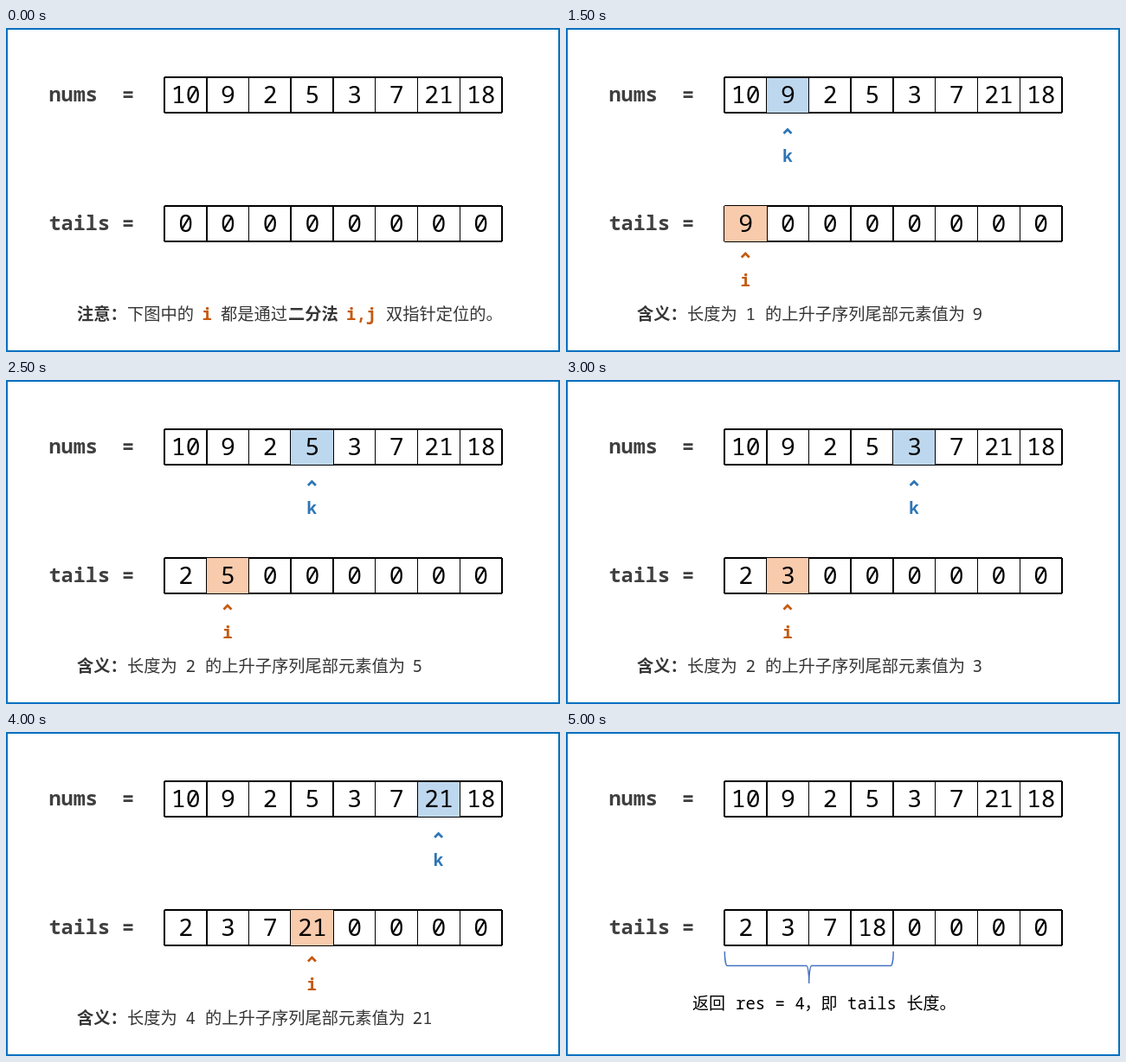
Recreate the animation shown at these times as an HTML page. Size 640x375 px, loop 6.5 s.

```html
<!DOCTYPE html>
<html lang="zh-CN">
<head>
<meta charset="utf-8">
<title>最长上升子序列</title>
<style>
  html, body { margin: 0; width: 100%; height: 100%; overflow: hidden; background: #fff; }
  svg { display: block; width: 640px; height: 375px; }
  text { white-space: pre; font-family: "Noto Sans Mono", "Noto Sans CJK SC", "Noto Sans CJK", monospace; }
  .cjk { font-family: "Noto Sans CJK SC", "Noto Sans CJK", sans-serif; }
  .label { font-size: 23.5px; font-weight: 700; fill: #404040; }
  .digit { font-size: 28px; text-anchor: middle; fill: #000; }
  .note { font-size: 19.25px; fill: #363636; }
  .result { font-size: 19px; fill: #000; }
  .bold { font-weight: 700; }
  .hot { font-weight: 700; fill: #c55a11; }
  .pointer { font-size: 19.4px; font-weight: 700; text-anchor: middle; }
</style>
</head>
<body>
<svg id="stage" viewBox="0 0 640 375"></svg>
<script>
const LOOP = 6500, INTRO = 1000, STEP = 500;
const LEFT = 183.3, CELL = 48.72, HEIGHT = 41;
const BLUE = '#2e75b6', ORANGE = '#c55a11';
const nums = [10, 9, 2, 5, 3, 7, 21, 18];
const stage = document.getElementById('stage');

const cellX = i => LEFT + i * CELL;
const centre = i => cellX(i) + CELL / 2;
const lineEnd = i => Math.floor(cellX(i)) + 1;
const lineWidth = i => [0, 1, 3, 4, 8].includes(i) ? 2 : 1;
const box = (x, y, w, h, fill = '#000') =>
  `<rect x="${x}" y="${y}" width="${w}" height="${h}" fill="${fill}"/>`;
const text = (x, y, cls, str, fill = '') =>
  `<text x="${x}" y="${y}" class="${cls}"${fill && ` style="fill:${fill}"`}>${str}</text>`;
const line = (y, cls, parts) =>
  parts.map(([x, str, extra = '']) => text(x, y, `${cls} ${extra}`, str)).join('');

// History of the tails array: one entry per processed number.
const steps = [];
const tails = nums.map(() => 0);
let length = 0;
nums.forEach((value, k) => {
  let i = 0;
  while (i < length && tails[i] < value) i++;
  tails[i] = value;
  length = Math.max(length, i + 1);
  steps.push({ k, i, value, tails: [...tails] });
});

// The active cell's fill leaves one pixel of line on each side; `top` is where it begins.
function row(y, name, values, active, fill, top) {
  let grid = '';
  for (let i = 0; i <= nums.length; i++)
    grid += box(lineEnd(i) - lineWidth(i), y, lineWidth(i), HEIGHT);
  const first = lineEnd(0) - 1, last = lineEnd(nums.length) - 1;
  for (const edge of [y - 1, y + HEIGHT - 1])
    grid += box(first, edge, last - first, 2);
  if (active >= 0) {
    const x = lineEnd(active) - lineWidth(active) + 1;
    grid += box(x, top, lineEnd(active + 1) - 1 - x, y + HEIGHT - top, fill);
  }
  return text(49.5, y + 28, 'label', name)
    + `<g shape-rendering="crispEdges">${grid}</g>`
    + values.map((v, i) => text(centre(i), y + 30, 'digit', v)).join('');
}

function pointer(i, y, name, colour) {
  const x = centre(i) - 0.4;
  return `<path d="M${x - 4.5} ${y + 4.5}L${x} ${y}L${x + 4.5} ${y + 4.5}" fill="none" stroke="${colour}" stroke-width="2.7"/>`
    + text(x, y + 37.5, 'pointer', name, colour);
}

const introNote = () => line(338, 'note', [
  [82, '注意：', 'cjk bold'], [140, '下图中的', 'cjk'], [226.5, 'i', 'hot'],
  [248, '都是通过', 'cjk'], [326, '二分法', 'cjk bold'], [393, 'i,j', 'hot'],
  [439, '双指针定位的。', 'cjk']
]);

const stepNote = ({ i, value }) => line(338, 'note', [
  [82, '含义：', 'cjk bold'], [140, '长度为', 'cjk'], [207.5, i + 1],
  [230, '的上升子序列尾部元素值为', 'cjk'], [469.5, value]
]);

function resultNote() {
  const a = LEFT, b = cellX(length), mid = (a + b) / 2;
  const brace = `M${a} 254A3 17 0 0 0 ${a + 3} 270.5H${mid - 3}A3 20 0 0 1 ${mid} 291`
    + `A3 20 0 0 1 ${mid + 3} 270.5H${b - 3}A3 17 0 0 0 ${b} 254`;
  return `<path d="${brace}" fill="none" stroke="#4472c4" stroke-width="1.4"/>`
    + line(321, 'result', [
      [146, '返回', 'cjk'], [196, `res = ${length}`], [275.5, '，即', 'cjk'],
      [325, 'tails'], [393.5, '长度。', 'cjk']
    ]);
}

let shown;
function draw(time) {
  const n = Math.min(Math.floor((time % LOOP - INTRO) / STEP), nums.length);
  const index = Math.max(n, -1);
  if (index === shown) return;
  shown = index;
  const step = steps[index];
  const values = index < 0 ? nums.map(() => 0) : step ? step.tails : tails;
  let out = row(57, 'nums  =', nums, step ? step.k : -1, '#bdd7ee', 58)
    + row(206, 'tails =', values, step ? step.i : -1, '#f8cbad', 206);
  if (step)
    out += pointer(step.k, 117.5, 'k', BLUE) + pointer(step.i, 261, 'i', ORANGE) + stepNote(step);
  else
    out += index < 0 ? introNote() : resultNote();
  out += '<rect x="1" y="1" width="638" height="373" fill="none" stroke="#0070c0" stroke-width="2"/>';
  stage.innerHTML = out;
}

const start = performance.now();
function tick() {
  draw(performance.now() - start);
  requestAnimationFrame(tick);
}
tick();
</script>
</body>
</html>
```
